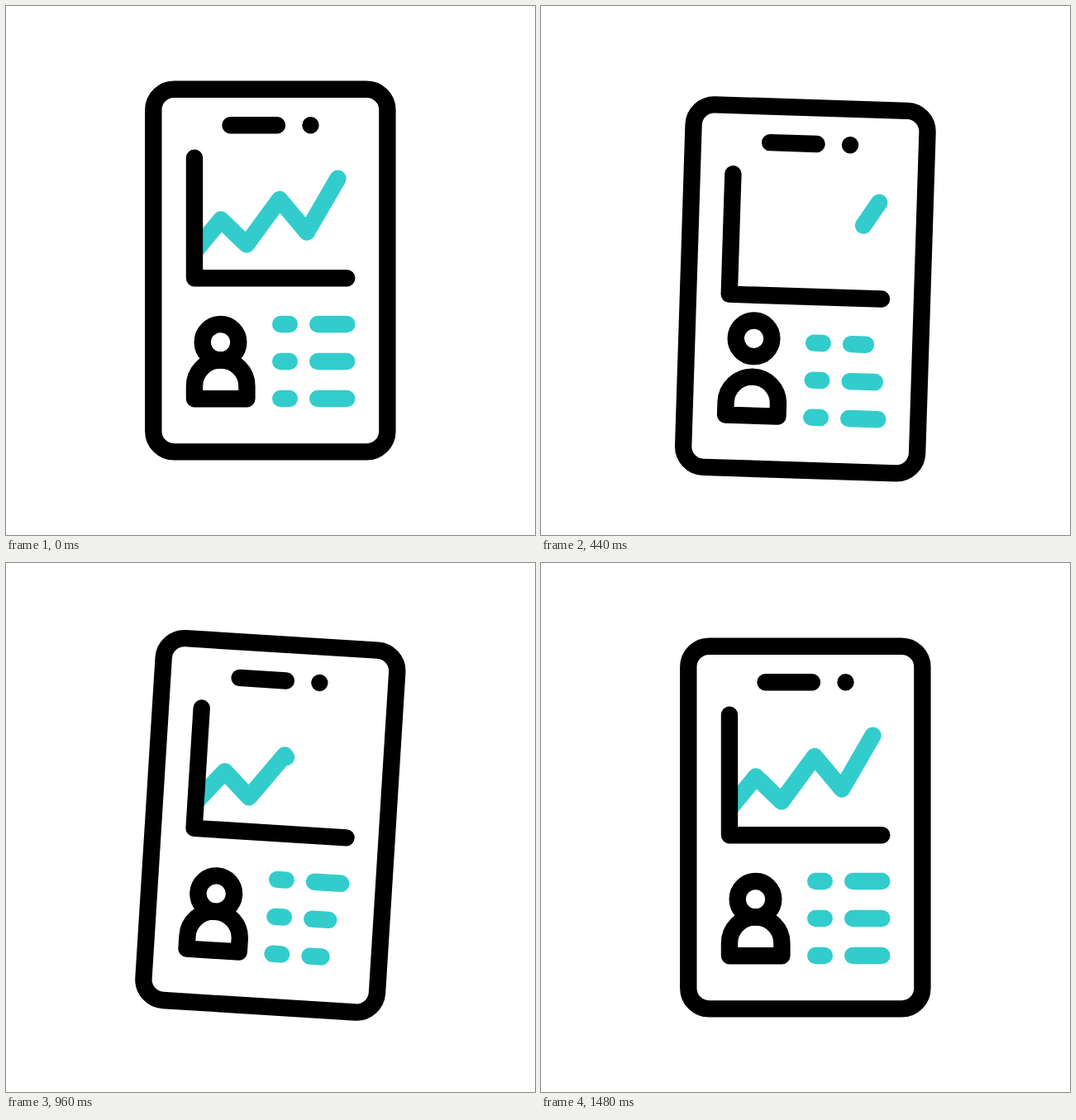
Write an HTML page that moves like this. It is 640x640 px and loops after 1.68 s.

```html
<!DOCTYPE html>
<html lang="en">
<head>
<meta charset="utf-8">
<title>Phone with chart and profile</title>
<style>
  html, body { margin: 0; width: 100%; height: 100%; overflow: hidden; background: #fff; }
  svg { display: block; width: 100vw; height: 100vh; fill: none; stroke: #000;
        stroke-width: 20.4; stroke-linecap: round; stroke-linejoin: round; }
  .accent { stroke: #33cccc; }
</style>
</head>
<body>
<svg viewBox="0 0 640 640">
  <g id="phone">
    <rect x="178.3" y="100.7" width="283.1" height="438.7" rx="25"/>
    <path d="M271.5 144.3H328M368.5 144.3h.01"/>
    <path id="trend" class="accent" pathLength="1"/>
    <path d="M228 183.7V329.3H412.3"/>
    <circle id="head" cx="259.5" cy="406.8" r="21.8"/>
    <path d="M228 475.3V460a31.7 31.7 0 0 1 63.4 0V475.3Z"/>
    <path id="bars" class="accent"/>
  </g>
</svg>
<script>
const LOOP = 1680, STEP = 40;
const [phone, trend, head, bars] =
  ['phone', 'trend', 'head', 'bars'].map(id => document.getElementById(id));

const clamp = (v, max) => Math.min(max, Math.max(0, v));

// Sine-eased swing through evenly spaced values
function swing(t, start, span, ...values) {
  const u = clamp((t - start) / span, values.length - 1);
  const i = Math.min(Math.floor(u), values.length - 2);
  const eased = (1 - Math.cos(Math.PI * (u - i))) / 2;
  return values[i] + (values[i + 1] - values[i]) * eased;
}

function drawTrend(t) {
  // The zigzag leans right and flattens while it is redrawn
  const bend = swing(t, 200, 280, 0, 1, 1, 0);
  const zigzag = [[260, 258.5], [291, 288.5], [331, 234], [364, 273.5], [401.5, 208.7]]
    .map(([x, y]) => [x + 4.5 * bend, y + (250 - y) * 0.1 * bend]);
  trend.setAttribute('d', `M228 297.5L${zigzag.join(' ')}`);

  const growing = t > 600;
  const grow = clamp((t - 604) / 696, 1);
  const from = growing ? 0 : swing(t, 100, 440, 0, 1);
  const to = growing ? grow * (1.25 - 0.25 * grow) : 1;
  trend.style.visibility = to > from ? 'visible' : 'hidden';
  trend.setAttribute('stroke-dasharray', `${to - from} 2`);
  trend.setAttribute('stroke-dashoffset', -from);
}

function drawBars(t) {
  const rows = [0, 1, 2].map(row => {
    const width = 35.1 - swing(t - 200 * row, 80, 500, 0, 21, 0);
    const y = 385 + 45 * row;
    return `M332.2 ${y}h10.6M377.2 ${y}h${width}`;
  });
  bars.setAttribute('d', rows.join(''));
}

function draw(t) {
  const tilt = swing(t, 40, 280, 0, 6.3, -5.2, 5.4, -4.3, 0);
  const bob = swing(t, 72, 322, 0, 24.5, -19.5, 0);
  phone.setAttribute('transform', `translate(0 ${bob}) rotate(${tilt} 320 320)`);
  head.setAttribute('transform', `translate(0 ${swing(t, 60, 335, 0, -26, 0)})`);
  drawBars(t);
  drawTrend(t);
}

const start = performance.now();
function frame() {
  const t = (performance.now() - start) % LOOP;
  draw(Math.floor(t / STEP) * STEP);
  requestAnimationFrame(frame);
}
frame();
</script>
</body>
</html>
```
